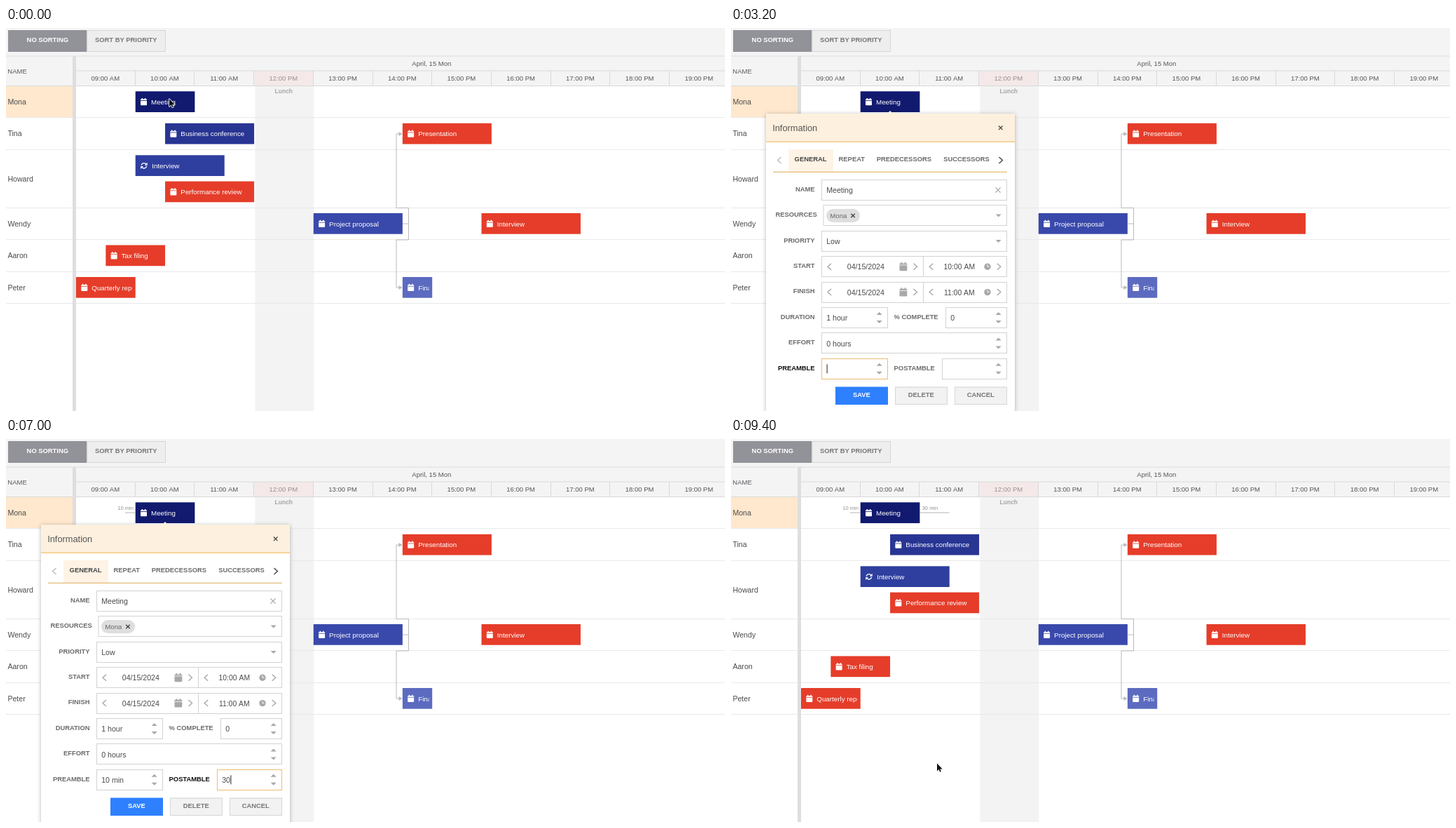
Recreate the animation shown at these times as an HTML page with a canvas. Size 1026 by 546 pixels, loop 9.6 s.

```html
<!DOCTYPE html>
<html lang="en">
<head>
<meta charset="utf-8">
<title>Scheduler with preamble and postamble</title>
<style>
  html, body { margin: 0; width: 100%; height: 100%; overflow: hidden; background: #fff; }
  canvas { display: block; width: 1026px; height: 546px; }
</style>
</head>
<body>
<canvas id="stage" width="1026" height="546"></canvas>
<script>
const W = 1026, H = 546, LOOP = 9600, STEP = 200;
const screen = document.getElementById('stage').getContext('2d');
const layer = Object.assign(document.createElement('canvas'), { width: W, height: H });
const popup = layer.getContext('2d');
let ctx = screen;

const ORANGE = '#eebc70', RED = '#cc3a2e', GREY = '#a8a8a8', LABEL = '#6b6b6b', INK = '#4a4a4a';
const COL = 84.7, LEFT = 100;
const people = [['Mona', 105], ['Tina', 150.5], ['Howard', 215], ['Wendy', 279], ['Aaron', 324.5], ['Peter', 370]];
const rowLines = [127.5, 173.5, 256.5, 301.5, 347.5, 392.5];
const TASK_RED = '#e53d2a';
// [title, start column, length in columns, top, colour]
const tasks = [
  ['Meeting', 1, 1, 90.3, '#111a6e'],
  ['Business conference', 1.5, 1.5, 135.8, '#283593'],
  ['Interview', 1, 1.5, 181.3, '#2f3f9f', true],
  ['Performance review', 1.5, 1.5, 218.6, TASK_RED],
  ['Presentation', 5.5, 1.5, 135.8, TASK_RED],
  ['Project proposal', 4, 1.5, 264, '#3949ab'],
  ['Interview', 6.83, 1.67, 264, TASK_RED],
  ['Tax filing', 0.5, 1, 309.5, TASK_RED],
  ['Quarterly report', 0, 1, 355, TASK_RED],
  ['Final review', 5.5, 0.5, 355, '#5c6bc0']
];

function rect(x, y, w, h, fill, stroke) {
  if (fill) { ctx.fillStyle = fill; ctx.fillRect(x, y, w, h); }
  if (stroke) { ctx.strokeStyle = stroke; ctx.lineWidth = 1; ctx.strokeRect(x + .5, y + .5, w - 1, h - 1); }
}

// y is the middle of the capitals
function text(s, x, y, size, color, bold = false, align = 'left') {
  ctx.font = `${bold ? 'bold ' : ''}${size}px "Liberation Sans", Arial, sans-serif`;
  ctx.textAlign = align;
  ctx.fillStyle = color;
  ctx.fillText(s, x, y + size * .36);
  return ctx.measureText(s).width;
}

function line(points, color, width = 1) {
  ctx.beginPath();
  points.forEach(([x, y]) => ctx.lineTo(x, y));
  ctx.strokeStyle = color;
  ctx.lineWidth = width;
  ctx.stroke();
}

function shape(points, fill) {
  ctx.beginPath();
  points.forEach(([x, y]) => ctx.lineTo(x, y));
  ctx.closePath();
  ctx.fillStyle = fill;
  ctx.fill();
}

function round(x, y, w, h, r, fill) {
  ctx.beginPath();
  ctx.roundRect(x, y, w, h, r);
  ctx.fillStyle = fill;
  ctx.fill();
}

function shadow(blur, color = 'rgba(0,0,0,.28)') {
  ctx.shadowBlur = blur;
  ctx.shadowColor = color;
}

const chevron = (x, y, dir, color) =>
  line([[x - 2.5 * dir, y - 4.5], [x + 2.5 * dir, y], [x - 2.5 * dir, y + 4.5]], color, 1.4);
const triangle = (x, y, dir) => shape([[x - 4, y - 2 * dir], [x + 4, y - 2 * dir], [x, y + 2 * dir]], GREY);

function cross(x, y, r, color) {
  line([[x - r, y - r], [x + r, y + r]], color, 1.3);
  line([[x - r, y + r], [x + r, y - r]], color, 1.3);
}

function calendar(x, y, color, gap, k = 1) {
  round(x, y - 4 * k, 9 * k, 9 * k, 1, color);
  rect(x + 1.6 * k, y - 5.3 * k, 1.5 * k, 2 * k, color);
  rect(x + 5.9 * k, y - 5.3 * k, 1.5 * k, 2 * k, color);
  rect(x, y - 2.2 * k, 9 * k, .8, gap);
}

function repeatIcon(x, y) {
  ctx.strokeStyle = '#fff';
  ctx.lineWidth = 1.4;
  for (const turn of [0, Math.PI]) {
    ctx.beginPath();
    ctx.arc(x, y, 3.7, turn + 3.3, turn + 5.8);
    ctx.stroke();
  }
  shape([[x + 4.8, y - 4.6], [x + 4.8, y - .6], [x + .9, y - .6]], '#fff');
  shape([[x - 4.8, y + 4.6], [x - 4.8, y + .6], [x - .9, y + .6]], '#fff');
}

function drawTask([title, start, length, top, color, repeats]) {
  const x = LEFT + start * COL, w = length * COL, mid = top + 15;
  rect(x, top, w, 29.7, color);
  if (repeats) repeatIcon(x + 12.2, mid);
  else calendar(x + 7.3, mid, '#fff', color);
  ctx.save();
  ctx.beginPath();
  ctx.rect(x, top, w - 4.5, 30);
  ctx.clip();
  text(title, x + (repeats ? 23.5 : 22.3), mid, 9.8, '#fff');
  ctx.restore();
}

function drawScheduler(t) {
  rect(0, 0, W, H, '#fff');
  rect(0, 0, W, 83, '#f4f4f4');
  rect(3, 3, 112.5, 31, '#929299');
  rect(115.5, 3, 112.5, 31, '#eeeeee', '#d6d6d6');
  text('NO SORTING', 59.3, 17, 9.4, '#fff', true, 'center');
  text('SORT BY PRIORITY', 171.3, 17, 9.4, '#77777b', true, 'center');

  rect(0, 39.5, W, 1, '#dedede');
  text('NAME', 2.3, 61.5, 9.5, '#5a5a60');
  text('April, 15 Mon', 607.3, 50.5, 9.5, '#55555b', false, 'center');
  rect(LEFT + 3 * COL, 61, COL, 21.5, '#f4e9e8');
  rect(LEFT, 60.5, W, 1, '#dcdcdc');
  for (let i = 0; i < 11; i++) {
    const x = LEFT + i * COL, label = `${String(i + 9).padStart(2, '0')}:00 ${i < 3 ? 'AM' : 'PM'}`;
    if (i) rect(Math.round(x) - 1, 61, 1, 22, '#d9d9dc');
    text(label, x + COL / 2 - .6, 72, 9.5, i === 3 ? '#98908f' : '#55555b', false, 'center');
  }
  rect(0, 82, W, 1, '#d8d8d8');

  rect(0, 83, 95, 44.5, '#ffe8cd');
  rect(355.5, 83, 84, H, '#f3f3f3');
  text('Lunch', 396.3, 90, 8.5, '#a5a5a5', true, 'center');
  rowLines.forEach(y => rect(0, y - .5, W, 1, '#e9e9e9'));
  rect(95, 40, 5, H, '#dedee1');
  people.forEach(([name, y]) => text(name, 2.4, y, 10.6, '#4c4c4c'));

  const link = '#b9b9bd';
  line([[566, 279], [574.5, 279], [574.5, 256.5], [557, 256.5], [557, 151], [562, 151]], link);
  line([[574.5, 279], [574.5, 302], [557, 302], [557, 370], [562, 370]], link);
  [151, 370].forEach(y => shape([[560.5, y - 3], [565.5, y], [560.5, y + 3]], link));
  tasks.forEach(drawTask);

  if (t >= 5600) {
    text('10 min', 159.3, 98.3, 7.5, '#909090');
    rect(170, 104.5, 14.6, 1, '#b4b4b4');
  }
  if (t >= 9200) {
    text('30 min', 272.7, 98.3, 7.5, '#909090');
    rect(269.5, 104.5, 42, 1, '#b4b4b4');
  }
}

const fieldMid = i => 231 + 36.4 * i;

function field(row, x, right, { label, labelX = 119.5, align = 'right', value = '', spin, focus, hot, invalid, caret }) {
  const y = fieldMid(row);
  const border = invalid ? RED : focus || hot ? ORANGE : '#d2d2d2';
  text(label, labelX, y - 1.5, 9.4, invalid ? RED : focus ? '#111' : LABEL, true, align);
  rect(x, Math.round(y - 15), right - x, 30, '#fff', border);
  const width = text(value, x + 7.2, y + .3, 10.6, INK);
  if (caret) rect(x + 7.6 + width, y - 6.5, 1, 13, '#222');
  if (spin) {
    triangle(right - 12.3, y - 6, -1);
    triangle(right - 12.3, y + 6, 1);
  }
}

function dateTimeField(row, label, time) {
  const y = fieldMid(row);
  field(row, 129, 394, { label });
  rect(274, Math.round(y - 15), 1, 30, '#d2d2d2');
  chevron(140.5, y, -1, GREY);
  text('04/15/2024', 192.3, y + .3, 10.6, INK, false, 'center');
  calendar(240.5, y, GREY, '#fff', 1.2);
  chevron(263, y, 1, GREY);
  chevron(285.7, y, -1, GREY);
  text(time, 325.8, y + .3, 10.4, INK, false, 'center');
  round(361.3, y - 4.7, 9.4, 9.4, 4.7, GREY);
  line([[366, y - 3], [366, y], [368.5, y]], '#fff');
  chevron(382.3, y, 1, GREY);
}

function button(label, x, fill, border, color) {
  rect(x, 511.5, 75, 25.5, fill, border);
  text(label, x + 37.3, 522.5, 9.4, color, true, 'center');
}

function errorTip(x) {
  const y = 485.7;
  shadow(6);
  round(x, y - 17.2, 109, 34.5, 2, RED);
  shadow(0, 'transparent');
  shape([[x + 1, y - 5], [x - 4.5, y], [x + 1, y + 5]], RED);
  round(x + 1, y - 16.2, 107, 32.5, 1.5, '#fff');
  shape([[x + 2, y - 4], [x - 3, y], [x + 2, y + 4]], '#fff');
  text('Invalid field value', x + 9.7, y + .3, 10.5, RED, true);
}

const typed = (s, t, start) => s.slice(0, Math.max(0, Math.floor((t - start) / STEP) + 1));
const halfTyped = s => s.endsWith('mi');

function drawEditor(t) {
  const pre = typed('10 min', t, 3600), post = typed('30 min', t, 6800);
  const inName = t < 2000, inPre = t >= 2200 && t < 5600, inPost = t >= 5600;
  const blink = (focused, from, typingFrom, typingTo) =>
    focused && (t >= typingFrom && t <= typingTo || (t - from) % 1000 < 500);

  ctx.clearRect(0, 0, W, H);
  shadow(6);
  rect(50, 122.5, 355, 450, '#fff');
  shadow(0, 'transparent');
  shape([[222, 123], [227, 118], [232, 123]], '#fef0de');
  rect(50, 122.5, 355, 39.5, '#fef0de');
  rect(50, 161.5, 355, 1.5, '#f3c983');
  text('Information', 59.2, 142.5, 12.8, '#555');
  cross(384.7, 142.3, 2.8, '#444');

  rect(82, 173, 64, 32, '#fef3e5');
  rect(60, 204.7, 334, 1.3, '#e6bd7c');
  chevron(69, 188.5, -1, '#bbb');
  chevron(385, 188.5, 1, '#444');
  [['GENERAL', 90.6], ['REPEAT', 153.6], ['PREDECESSORS', 207.8], ['SUCCESSORS', 303.2]]
    .forEach(([s, x], i) => text(s, x, 187, 9.4, i ? LABEL : '#444', true));

  field(0, 129, 394, { label: 'NAME', value: 'Meeting', focus: inName, caret: blink(inName, 1200, 0, 0) });
  cross(381, 231, 3.6, GREY);
  field(1, 131.5, 394, { label: 'RESOURCES', labelX: 122.8 });
  round(136, 258, 48, 19, 9.5, '#dedede');
  text('Mona', 141.3, 267.5, 9.6, '#666');
  cross(174, 267.5, 2.8, '#444');
  triangle(381.7, 267.5, 1);
  field(2, 129, 394, { label: 'PRIORITY', value: 'Low' });
  triangle(381.7, 304, 1);
  dateTimeField(3, 'START', '10:00 AM');
  dateTimeField(4, 'FINISH', '11:00 AM');
  field(5, 129, 224, { label: 'DURATION', value: '1 hour', spin: true });
  field(5, 306, 394, { label: '% COMPLETE', labelX: 232.6, align: 'left', value: '0', spin: true });
  field(6, 129, 394, { label: 'EFFORT', value: '0 hours', spin: true });
  field(7, 129, 224, {
    label: 'PREAMBLE', value: pre, spin: true, focus: inPre, hot: t === 2000,
    invalid: halfTyped(pre), caret: blink(inPre, 2200, 3600, 4800)
  });
  field(7, 301, 394, {
    label: 'POSTAMBLE', labelX: 232.6, align: 'left', value: post, spin: true, focus: inPost,
    invalid: halfTyped(post), caret: blink(inPost, 5600, 6800, 8000)
  });

  button('SAVE', 149, t >= 8600 ? '#5f9eff' : '#2e80ff', null, '#fff');
  button('DELETE', 234, '#f2f2f2', '#d6d6d6', '#77777b');
  button('CANCEL', 319, '#f2f2f2', '#d6d6d6', '#77777b');
  if (halfTyped(pre)) errorTip(229.5);
  if (halfTyped(post)) errorTip(399.5);
}

const ARROW = new Path2D('M0 0V11L2.6 8.6 4.2 12.3 5.9 11.6 4.3 8H7.7Z');
const HAND = new Path2D('M-1 0Q0-1 1 0V4Q2 3 3 4.4 4 3.7 5 5 6.3 4.6 6.5 6V9Q6 11 5 13H-1Q-2 10-4.3 8-4.3 6.3-2.5 7L-1 8Z');
// [time, x, y]
const trail = [[0, 233, 101], [800, 233, 101], [1200, 233, 146], [2000, 176, 470],
  [8200, 176, 484], [8600, 189, 523], [9000, 190, 523], [9400, 294, 462.5], [LOOP, 294, 462.5]];

function drawCursor(t) {
  if (t > 2000 && t < 8200) return;
  const i = trail.findIndex(p => p[0] > t);
  const [t0, x0, y0] = trail[i - 1], [t1, x1, y1] = trail[i];
  const k = (t - t0) / (t1 - t0), ease = k * k * (3 - 2 * k);
  const hand = t >= 8600 && t <= 9000;
  ctx.save();
  ctx.translate(x0 + (x1 - x0) * ease, y0 + (y1 - y0) * ease);
  ctx.lineJoin = 'round';
  ctx.strokeStyle = hand ? '#111' : '#fff';
  ctx.fillStyle = hand ? '#fff' : '#111';
  ctx.lineWidth = hand ? 1.2 : 1.6;
  if (hand) ctx.fill(HAND);
  ctx.stroke(hand ? HAND : ARROW);
  if (!hand) ctx.fill(ARROW);
  ctx.restore();
}

function editorOpacity(t) {
  if (t < 1200 || t >= 9400) return 0;
  return t === 1200 ? .72 : t === 9200 ? .5 : 1;
}

function render(now) {
  const t = Math.floor(now % LOOP / STEP) * STEP;
  const opacity = editorOpacity(t);
  ctx = screen;
  drawScheduler(t);
  if (opacity) {
    ctx = popup;
    drawEditor(t);
    ctx = screen;
    ctx.globalAlpha = opacity;
    ctx.drawImage(layer, 0, 0);
    ctx.globalAlpha = 1;
  }
  drawCursor(t);
}

const begin = performance.now();
function tick() {
  render(performance.now() - begin);
  requestAnimationFrame(tick);
}
tick();
</script>
</body>
</html>
```
